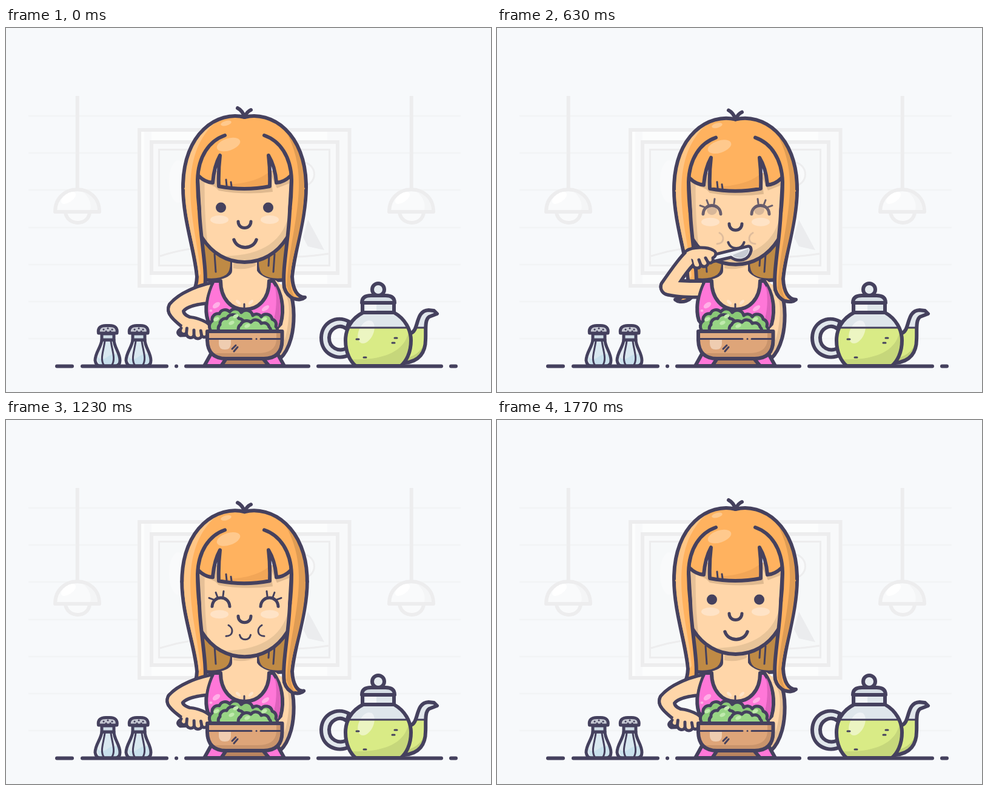
Recreate the animation shown at these times as an HTML page. Size 800 by 600 pixels, loop 1.8 s.

```html
<!DOCTYPE html>
<html lang="en">
<head>
<meta charset="utf-8">
<title>Salad lunch</title>
<style>
html, body { margin: 0; width: 100%; height: 100%; overflow: hidden; background: #f7f9fb; }
svg { display: block; width: 100vw; height: 100vh; }
.ink { stroke: #45415e; stroke-width: 6; stroke-linecap: round; stroke-linejoin: round; }
.mid { stroke-width: 5; }
.thin { stroke-width: 3; }
.wide { stroke-width: 11; }
.none { fill: none; }
.pale { stroke: #ededee; stroke-width: 6; stroke-linejoin: round; }
.hair { fill: #ffb25f; }
.skin { fill: #ffd6a9; }
.leaf { fill: #98d585; }
</style>
</head>
<body>
<svg id="stage" viewBox="0 0 800 600" xmlns="http://www.w3.org/2000/svg"></svg>
<script>
const LOOP = 1800;
const MIRROR = 'matrix(-1 0 0 1 787 0)';
const FACE_MIRROR = 'matrix(-1 0 0 1 789 0)';

const path = (d, cls = '', extra = '') => `<path d="${d}" class="${cls}" ${extra}/>`;
const fill = (d, color, extra = '') => path(d, '', `fill="${color}" ${extra}`);
const line = (d, cls = '') => path(d, 'ink none ' + cls);
const oval = (x, y, rx, ry, color, turn = 0) =>
  `<ellipse cx="${x}" cy="${y}" rx="${rx}" ry="${ry}" fill="${color}" transform="rotate(${turn} ${x} ${y})"/>`;
const box = (x, y, w, h, color, width = 6) =>
  `<rect x="${x}" y="${y}" width="${w}" height="${h}" fill="${color}" stroke="#ededee" stroke-width="${width}"/>`;
const mirrored = (s, axis = MIRROR) => s + `<g transform="${axis}">${s}</g>`;
const clip = (id, d) => `<clipPath id="${id}"><path d="${d}"/></clipPath>`;
const clipped = (id, s) => `<g clip-path="url(#${id})">${s}</g>`;

function wall() {
  const rows = [145, 206, 267, 329, 390, 451, 512].map(y => `M37,${y}H750`).join('');
  return path(rows, 'none', 'stroke="#f2f4f5" stroke-width="2.5"') +
    box(220, 168, 346.5, 257, '#fcfdfd') +
    fill('M228,171H240V422H228ZM530,171H563V422H530Z', '#f8f9fa') +
    box(240, 188, 307, 216, '#f8f9fa') +
    box(252.5, 200.5, 281, 191, '#f6f8f9', 3) +
    oval(284, 253, 15, 35, '#f9fafb') +
    '<circle cx="489" cy="241" r="19.5" fill="#f9fafb" class="pale" style="stroke-width:3"/>' +
    fill('M490,345L498,316L525,366L498,360Z', '#ebecee') +
    path('M254,376Q330,352 393,368T532,372', 'none', 'stroke="#ededee" stroke-width="3"') +
    lamp(0) + lamp(551);
}

function lamp(dx) {
  return `<g transform="translate(${dx} 0)">` +
    path('M117.7,112V264', 'pale none') +
    path('M98,303C100,327 137,327 138,303Z', 'pale', 'fill="#f9fafb"') +
    path('M81,303C81,254 154,254 154,303Z', 'pale', 'fill="#f9fafb"') +
    fill('M139,300Q142,283 127,270Q150,278 151,300Z', '#f4f5f6') +
    oval(103, 280, 14, 7, '#fff', -35) + '</g>';
}

function shaker(dx) {
  const body = 'M158,514C157,526 147,535 147,548Q148,556 155,557H181Q188,556 188,548C188,535 178,526 178,514Z';
  return `<g transform="translate(${dx} 0)">` +
    fill(body, '#e3ebf1') +
    fill('M163,516C160,530 157,545 161,556H176C180,545 176,530 173,516Z', '#d9e8f0') +
    fill('M149,540Q157,550 166,543T187,538V552L180,556H154Z', '#bfdcea', 'opacity=".6"') +
    line('M163,516C161,532 155,545 161,555M173,516C175,532 181,545 175,555', 'thin') +
    line(body, 'mid') +
    path('M158,504H178V514H158Z', 'ink mid', 'fill="#cfdde6"') +
    path('M152.500,503Q150.500,490.500 165,490.500H171Q185,490.500 183,503Z', 'ink mid', 'fill="#c5c8d2"') +
    line('M161,497h.1M168,495h.1M175,497h.1M165,500h.1M172,500h.1', 'thin') + '</g>';
}

function teapot() {
  const body = 'M589,469C569,479 560,497 560,515C560,535 568,550 577,557H651C660,550 668,535 668,515C668,497 658,479 640,469Z';
  const spout = 'M667,503C682,500 674,466 697,465L706,466L711,471L698,476C690,481 693,500 692,514C692,534 682,550 657,552Z';
  return clip('pot', body) + clip('spout', spout) +
    path('M566,484C545,472 520,486 520,511C520,537 546,550 568,538L563,527C548,536 533,526 533,511C533,496 549,486 562,496Z', 'ink', 'fill="#e1e7ec"') +
    fill(spout, '#e1e7ec') +
    clipped('spout', fill('M650,494H700V560H650Z', '#d9eb86') + fill('M693,505Q690,540 655,545V556H700V505Z', '#c1d278')) +
    line('M678,494H690', 'thin') + line(spout) +
    fill(body, '#dfe6eb') +
    clipped('pot', fill('M550,494H680V560H550Z', '#d9eb86') +
      fill('M664,494C664,525 635,549 568,546V560H680V494Z', '#c6d77b') +
      oval(594, 501, 12, 20, 'rgba(255,255,255,.5)', 25)) +
    line('M565,494H663M578,513h4M641,511h4M637,519h4M590,543h4', 'thin') + line(body) +
    path('M588,453H640V469H588Z', 'ink', 'fill="#dfe6eb"') +
    fill('M593,456H611V466H593Z', '#f2f6f8') +
    path('M587,453Q587,441 602,441H626Q641,441 641,453Z', 'ink', 'fill="#d5dde4"') +
    '<circle cx="614" cy="431" r="10" class="ink" fill="#e6ecf0"/>';
}

function torso() {
  const top = 'M342,417C331,438 327,464 333,482L348,502H440L453,488C460,462 455,437 441,417H434C434,447 416,464 393.500,464C372,464 354,447 354,417Z';
  const backHair = fill('M326,335V415Q352,420 365,409Q373,403 373,384V335Z', '#bf8a45') +
    line('M327,415Q352,418 365,409Q373,403 373,386') + line('M344,373L346,402', 'thin');
  return mirrored(backHair) + line('M434,376L433,392', 'thin') +
    fill('M373,370H414V400Q420,411 445,416L468,434C477,455 476,490 470,512Q464,534 452,545H380L340,470L346,416Q373,411 373,400Z', '#ffd6a9') +
    fill('M375,380H412V392Q394,400 375,396Z', '#e4be94') +
    fill('M455,432Q470,445 466,480Q462,520 447,543L455,541Q472,510 472,470Q470,440 462,428Z', '#e6bf95') +
    line('M468,434C477,455 476,490 470,512Q464,534 452,545') +
    path('M342,530L327,557H459L444,530Z', 'ink', 'fill="#ff77d8"') +
    path(top, 'ink', 'fill="#ff77d8"') +
    fill('M444,426Q450,465 436,496H448Q459,455 445,426Z', '#df62bd') +
    oval(347, 457, 7, 4, '#ffb0e7', -35) + oval(338, 466, 2.5, 2, '#ffb0e7') + oval(428, 462, 7, 3.5, '#ffb0e7', -35) +
    oval(383, 452, 5, 2.500, '#ffe4c8', 45) + oval(404, 452, 5, 2.500, '#ffe4c8', -45) +
    line('M393,455V464', 'thin');
}

function head() {
  const cap = 'M393.500,147C350,136 292,172 292,262L318,300V244Q328,254 341,255Q343,228 353,210Q350,235 351,261Q393,269 435,261Q436,235 433,210Q444,228 446,255Q459,254 469,244V300L495,262C495,172 437,136 393.500,147Z';
  const faceShape = 'M318,235L323,345C340,372 365,386 393.500,386C422,386 447,372 464,345L469,235Z';
  const closedEye = line('M340,303C341,284 368,284 369,303', 'mid') +
    line('M335,289L343,292M346,280L349,288M359,278L358,286', 'thin');
  return clip('face', faceShape) + fill(faceShape, '#ffd6a9') +
    clipped('face', fill('M318,240H328Q326,300 333,360L318,345Z', '#e6c097') +
      fill('M468,300Q456,375 360,376L393,392L450,385L475,330Z', '#e8c499') +
      fill('M318,250L345,262L351,268Q393,276 440,270L436,240L447,264L470,255V230H318Z', '#dfb98f')) +
    line('M323,345C340,372 365,386 393.500,386C422,386 447,372 464,345') +
    mirrored(oval(352, 316, 15, 7, '#ffe3c6')) +
    '<g id="openEyes" fill="#45415e"><circle cx="354.500" cy="296" r="8.500"/><circle cx="432.500" cy="296" r="8.500"/></g>' +
    `<g id="closedEyes">${mirrored(closedEye, FACE_MIRROR)}</g>` +
    line('M383,319C383,333 404,333 404,319', 'mid') +
    '<path id="mouth" class="ink none"/>' +
    `<g id="cheeks">${mirrored(line('M367,334C376,339 375,352 363,352', 'thin'), FACE_MIRROR)}</g>` +
    '<path id="strandL" class="ink hair"/>' +
    `<g transform="${MIRROR}"><path id="strandR" class="ink hair"/></g>` +
    fill(cap, '#ffb25f') +
    fill('M355,258Q408,258 433,238L432,259Q393,266 355,259Z', '#f2a657') +
    '<path id="shine" fill="#ffc686"/><path id="shade" fill="#df9c54"/>' +
    oval(367, 192, 20, 10, '#ffc98d', -18) + oval(363, 157, 9, 4, '#ffc98d', -15) +
    line('M318,244Q328,254 341,255Q343,228 353,210Q350,235 351,261Q393,269 435,261Q436,235 433,210Q444,228 446,255Q459,254 469,244') +
    mirrored(line('M361,177C335,186 317,212 316,250Q316,275 319,302')) +
    '<path id="crown" class="ink none"/>' +
    line('M363,250L364,260M371,254L372,261', 'thin') +
    line('M382,132Q390,136 393.500,147Q397,138 404,135');
}

function arm() {
  const hand = 'M-4,-9C5,-15 29,-16 39,-10C46,-7 45,0 39,3C41,10 35,13 31,10C32,17 23,20 19,14C19,21 9,22 6,15C2,21 -7,18 -5,10';
  const leaf = 'M75,-6a7,7 0 0 1 5,-11a8,8 0 0 1 14,-2a7,7 0 0 1 12,4a6,6 0 0 1 0,9Z';
  return clip('sleeve', 'M0,0H342V413C329,438 325,464 331,484V600H0Z') +
    clipped('sleeve', '<path id="upperInk" class="ink wide"/>') +
    '<path id="foreInk" class="ink wide"/>' +
    '<g id="spoon">' +
    `<g id="bite">${path(leaf, 'ink mid leaf')}${oval(86, -14, 4, 2.500, '#c3ebb2', -20)}</g>` +
    path('M0,-5H112q7,0 5,8C110,18 92,18 82,6L0,5q-7,-5 0,-10Z', 'ink mid', 'fill="#eff1f5"') +
    fill('M86,3L114,-1C111,14 95,14 86,5Z', '#c7cbd3') + '</g>' +
    clipped('sleeve', '<path id="upper" class="skin"/>') +
    `<g id="hand">${path(hand, 'ink mid skin')}${line('M31,10L27,3M19,14L16,6M6,15L4,7', 'mid')}</g>` +
    '<path id="fore" class="skin"/>';
}

function salad() {
  const bowl = 'M332,500H455.500V515Q455,545 425,545H363Q333,545 332,515Z';
  return path('M363,545H424L434,557H355Z', 'ink', 'fill="#b98460"') +
    path('M342,502a11,11 0 0 1 -2,-19a10,10 0 0 1 12,-12a10,10 0 0 1 17,-3a11,11 0 0 1 19,1a11,11 0 0 1 19,5a9,9 0 0 1 14,2a10,10 0 0 1 18,4a9,9 0 0 1 6,12a8,8 0 0 1 0,12Z', 'ink mid', 'fill="#8ac977"') +
    path('M354,502a8,8 0 0 1 -1,-13a9,9 0 0 1 11,-10a11,11 0 0 1 20,0a9,9 0 0 1 9,10L390,502Z', 'ink mid leaf') +
    path('M386,502a8,8 0 0 1 1,-13a11,11 0 0 1 17,-4a10,10 0 0 1 17,2a9,9 0 0 1 13,6a8,8 0 0 1 2,9Z', 'ink mid leaf') +
    [[347, 480], [379, 475], [372, 486], [398, 491], [426, 480]].map(([x, y]) => oval(x, y, 5, 3, '#c0eaae', -25)).join('') +
    clip('bowl', bowl) + fill(bowl, '#dea579') +
    clipped('bowl', fill('M330,500H460V512H330Z', '#e2ad82') +
      fill('M446,500V515Q444,536 415,536H335V550H460V500Z', '#c9946c') +
      fill('M351,513H371V520Q371,530 361,530Q351,530 351,520Z', '#efcdb1')) +
    line('M334,512.500H405M413,512.500h.1M420,512.500H453M373,529L379,523M376,533L382,526', 'thin') + line(bowl);
}

document.getElementById('stage').innerHTML =
  '<rect width="800" height="600" fill="#f7f9fb"/>' + wall() + shaker(0) + shaker(51) + teapot() +
  torso() + `<g id="head">${head()}</g>` + arm() + salad() +
  line('M84,557.500H109M126,557.500H265M281,557.500h.1M297,557.500H499M515,557.500H718M734,557.500H742');

const el = {};
document.querySelectorAll('[id]').forEach(node => { el[node.id] = node; });
const set = (id, attrs) => { for (const k in attrs) el[id].setAttribute(k, attrs[k]); };

const lerp = (a, b, u) => a + (b - a) * u;
function smooth(t, from, to) {
  const u = Math.min(1, Math.max(0, (t - from) / (to - from)));
  return u * u * (3 - 2 * u);
}
const pulse = (t, a, b, c, d) => smooth(t, a, b) - smooth(t, c, d);

// Arm poses: in the bowl, halfway, at the mouth.
const POSES = {
  upper: [
    'M344,422 C318,426 286,440 273,456 C264,470 282,484 289,468 C293,458 312,452 336,451 Z',
    'M326,424 C310,423 290,424 270,431 C262,436 270,444 285,440 C300,439 312,438 326,436 Z',
    'M338,420 C320,420 305,420 290,418 C270,414 268,434 282,437 C300,441 315,441 338,441 Z'],
  fore: [
    'M272,457 C266,469 278,479 294,492 L309,482 C300,478 290,475 290,466 C290,452 278,450 272,457 Z',
    'M268,440 C274,444 290,440 304,435 L312,415 C302,419 292,424 276,427 C264,430 262,437 268,440 Z',
    'M288,436 C296,424 304,408 322,388 L317,368 C306,376 288,402 274,422 C270,430 280,440 288,436 Z'],
  hand: [[297, 487, 20], [307, 425, 0], [317, 376, 0]],
  spoon: [[287, 502, -3], [296, 441, -14], [305, 392, -14]]
};

function armPath(name, i, u, bulge) {
  const from = POSES[name][i], to = POSES[name][i + 1].match(/-?\d+/g);
  let n = 0;
  return from.replace(/-?\d+/g, v => {
    const isX = n % 2 === 0, mixed = lerp(+v, +to[n++], u);
    const reach = Math.min(1, Math.max(0, (320 - mixed) / 50));
    return (isX ? mixed - bulge * reach : mixed).toFixed(2);
  });
}

function drawArm(t) {
  const p = 2 * pulse(t, 30, 570, 900, 1260);
  const i = p < 1 ? 0 : 1, u = p - i;
  const bulge = (i ? 0 : 12 * Math.sin(Math.PI * u)) + 2 * pulse(t, 1200, 1300, 1380, 1560);
  for (const name of ['upper', 'fore']) {
    const d = armPath(name, i, u, bulge);
    set(name, { d });
    set(name + 'Ink', { d });
  }
  for (const name of ['hand', 'spoon']) {
    const [x, y, turn] = POSES[name][i].map((v, k) => lerp(v, POSES[name][i + 1][k], u));
    set(name, { transform: `translate(${x - bulge * 0.2} ${y}) rotate(${turn})` });
  }
  set('bite', { opacity: t > 60 && t < 590 ? 1 : 0 });
}

function drawHead(t) {
  const dip = 8 * (pulse(t, 330, 510, 510, 740) + pulse(t, 1100, 1350, 1350, 1750));
  set('head', { transform: `translate(0 ${dip})` });

  const closed = pulse(t, 560, 660, 1620, 1740);
  set('closedEyes', { opacity: closed });
  set('openEyes', { opacity: 1 - closed });

  const chew = pulse(t, 600, 720, 1620, 1740);
  set('cheeks', { opacity: chew });

  const m = pulse(t, 560, 690, 1620, 1740);
  const w = lerp(18.5, 9, m), top = lerp(349, 350, m), deep = top + lerp(17, 10, m);
  set('mouth', {
    d: `M${394.5 - w},${top}C${394.5 - w * 0.7},${deep} ${394.5 + w * 0.7},${deep} ${394.5 + w},${top}`,
    style: `stroke-width:${lerp(5.5, 3, m)}`
  });

  // The long strands swing out a little while she chews.
  const s = pulse(t, 640, 880, 1600, 1770) * (1 + dip * 0.18);
  const left = 292 - s, right = 495 + s;
  const strand = `M${left},262C${left},315 312,370 315,410C314,432 306,444 ${294 + s},${444 - s}` +
    `C302,${451 - s} 322,448 328,428C332,400 321,350 319,302L316,250Z`;
  set('strandL', { d: strand });
  set('strandR', { d: strand });
  set('crown', { d: `M${left},262C${left},172 350,136 393.5,147C437,136 ${right},172 ${right},262` });
  set('shine', { d: `M${left + 3},262C${left + 3},205 318,165 345,156C318,180 305,215 304,262C304,315 317,360 321,405L318,410C315,365 ${left + 3},318 ${left + 3},262Z` });
  set('shade', { d: `M${right - 3},262C${right - 3},215 478,185 461,169C478,200 484,230 483,265C481,320 465,370 463,425Q467,440 476,444Q466,425 470,400C475,365 ${right - 3},318 ${right - 3},262Z` });
}

function frame(now) {
  const t = now % LOOP;
  drawHead(t);
  drawArm(t);
  requestAnimationFrame(frame);
}
frame(0);
</script>
</body>
</html>
```
